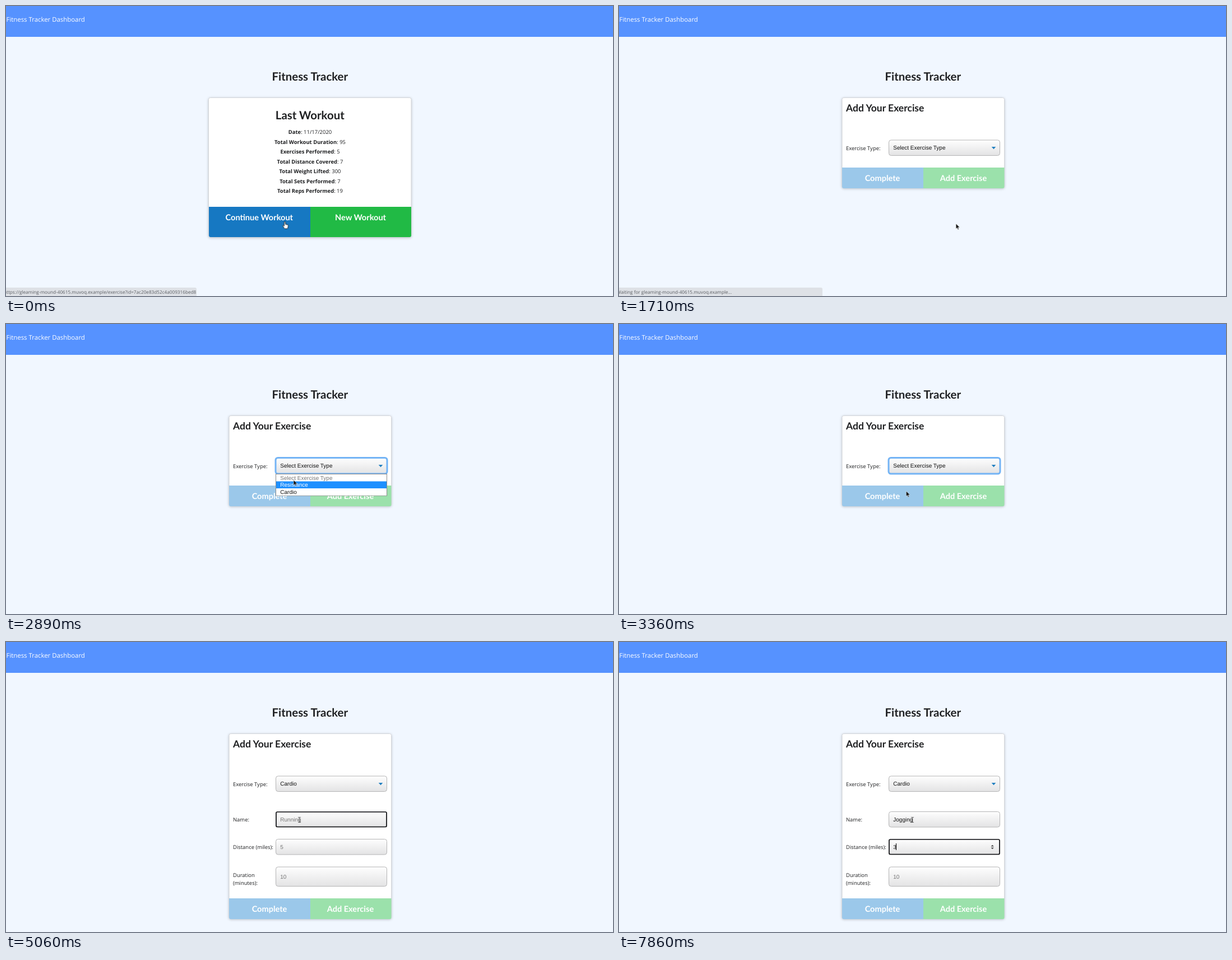
Animation, 1083 px wide and 517 px high, one loop 8000 ms. Source, as an HTML page:

```html
<!DOCTYPE html>
<html lang="en">
<head>
<meta charset="utf-8">
<title>Fitness Tracker</title>
<style>
html, body { margin: 0; height: 100%; overflow: hidden; background: #f1f7ff; }
svg { display: block; width: 100vw; height: 100vh; text-rendering: geometricPrecision; }
text { font: 9.45px "Open Sans", "Noto Sans", sans-serif; fill: #1f2022; white-space: pre; }
.b { font-weight: 700; }
.mid { text-anchor: middle; }
.bar { font-size: 11.4px; fill: #fff; }
.h1, .h2, .btn { font-family: Lato, sans-serif; font-weight: 700; }
.h1 { font-size: 20.4px; }
.h2 { font-size: 17.5px; }
.btn { font-size: 14.55px; fill: #fff; }
.field text { font: 10px "Liberation Sans", Arial, sans-serif; fill: #111; }
.field .hint { fill: #757575; }
.box { fill: url(#shade); stroke: #b4b4b5; }
.outline { fill: none; stroke: #101114; stroke-width: 1.7; }
.outline, .spin { display: none; }
.spin { fill: #444; }
.focus .outline, .focus .spin { display: block; }
.status path { fill: #dee1e6; }
.status text { font-size: 8.2px; fill: #5a5d62; }
.card { fill: #fff; stroke: #d4d6da; filter: drop-shadow(0 1px 2px rgba(0,0,0,.22)); }

/* 1% = 80ms */
svg [id] { animation: 8s step-end infinite; }
#home { animation-name: until-load; }
#exercise { animation-name: from-load; }
#goOn { animation-name: leave; }
#fresh { animation-name: enter; }
#link1 { animation-name: link1; }
#link2 { animation-name: link2; }
#wait { animation-name: wait; }
#sheet { animation-name: grow; }
#actions { animation-name: drop; }
#unset { animation-name: until-pick; }
#picked { animation-name: from-pick; }
#ring { animation-name: ring; }
#ghost { animation-name: ghost; }
#menu { animation-name: menu; }
#row1 { animation-name: row1; }
#row2 { animation-name: row2; }
#menu .opt { fill: currentColor; }
#pointer { animation-name: travel; animation-timing-function: ease-in-out; }
#hand { animation-name: hand; }
#arrow { animation-name: arrow; }
#beam { animation-name: beam; }
#click { animation-name: click; }
@keyframes until-load { 0% { opacity: 1 } 17.375% { opacity: 0 } }
@keyframes from-load { 0% { opacity: 0 } 17.375% { opacity: 1 } }
@keyframes leave { 0% { fill: #1678c2 } 12% { fill: #2185d0 } }
@keyframes enter { 0% { fill: #21ba45 } 12% { fill: #16ab39 } 15.5% { fill: #0ea432 } }
@keyframes link1 { 0% { opacity: 1 } 12% { opacity: 0 } }
@keyframes link2 { 0% { opacity: 0 } 12% { opacity: 1 } 15.5% { opacity: 0 } }
@keyframes wait { 0% { opacity: 0 } 15.5% { opacity: 1 } 22.375% { opacity: 0 } }
@keyframes grow { 0% { height: 161px } 42.75% { height: 330px } }
@keyframes drop { 0% { transform: none } 42.75% { transform: translateY(169px) } }
@keyframes until-pick { 0% { opacity: 1 } 42.75% { opacity: 0 } }
@keyframes from-pick { 0% { opacity: 0 } 42.75% { opacity: 1 } }
@keyframes ring { 0% { opacity: 0 } 28% { opacity: 1 } 56.5% { opacity: 0 } }
@keyframes ghost { 0% { opacity: 0 } 29% { opacity: 1 } 30% { opacity: 0 } }
@keyframes menu { 0% { opacity: 0 } 30% { opacity: 1 } 42% { opacity: 0 } }
@keyframes row1 { 0% { fill: #fff; color: #111 } 36% { fill: #1e90ff; color: #fff } 38% { fill: #fff; color: #111 } }
@keyframes row2 { 0% { fill: #fff; color: #111 } 38% { fill: #1e90ff; color: #fff } }
@keyframes hand { 0% { opacity: 1 } 18.375% { opacity: 0 } }
@keyframes arrow { 0% { opacity: 0 } 18.375% { opacity: 1 } 51.5% { opacity: 0 } }
@keyframes beam { 0% { opacity: 0 } 51.5% { opacity: 1 } }
@keyframes click { 0% { opacity: 0 } 28% { opacity: .75 } 30% { opacity: 0 } }
@keyframes travel {
  0%, 8.75% { transform: translate(497.5px, 384.5px) }
  15.5%, 20.375% { transform: translate(604px, 392px) }
  28.5%, 33% { transform: translate(513.5px, 263.5px) }
  39.875%, 51.49% { transform: translate(512.5px, 298px) }
  51.5% { transform: translate(512px, 303px) }
  57%, 100% { transform: translate(523.5px, 317px) }
}
</style>
</head>
<body>
<svg viewBox="0 0 1083 517">
  <defs>
    <linearGradient id="shade" x2="0" y2="1"><stop stop-color="#fefefe"/><stop offset="1" stop-color="#e3e3e4"/></linearGradient>
  </defs>
  <rect width="1083" height="517" fill="#f1f7ff"/>
  <rect width="1083" height="55" fill="#5692ff"/>
  <text class="bar" x=".5" y="27.5">Fitness Tracker Dashboard</text>
  <text class="h1 mid" x="542.3" y="133.3">Fitness Tracker</text>

  <g id="home">
    <rect class="card" x="361.5" y="163.5" width="361.5" height="248.5" rx="3"/>
    <text class="h1 mid" x="542.3" y="202.2">Last Workout</text>
    <g class="mid">
      <text x="542.5" y="228.2"><tspan class="b">Date</tspan>: 11/17/2020</text>
      <text x="542.5" y="245.8"><tspan class="b">Total Workout Duration</tspan>: 95</text>
      <text x="542.5" y="263.3"><tspan class="b">Exercises Performed</tspan>: 5</text>
      <text x="542.5" y="280.8"><tspan class="b">Total Distance Covered</tspan>: 7</text>
      <text x="542.5" y="298.3"><tspan class="b">Total Weight Lifted</tspan>: 300</text>
      <text x="542.5" y="315.8"><tspan class="b">Total Sets Performed</tspan>: 7</text>
      <text x="542.5" y="333.4"><tspan class="b">Total Reps Performed</tspan>: 19</text>
    </g>
    <path id="goOn" d="M362 358h181v54h-178a3 3 0 0 1-3-3z"/>
    <path id="fresh" d="M543 358h180v51a3 3 0 0 1-3 3h-177z"/>
    <text class="btn mid" x="451.8" y="382.2">Continue Workout</text>
    <text class="btn mid" x="632.5" y="382.2">New Workout</text>
  </g>

  <g id="exercise">
    <rect id="sheet" class="card" x="398" y="163.5" width="289.5" height="161" rx="3"/>
    <text class="h2" x="405" y="188.3">Add Your Exercise</text>
    <text x="405" y="256.6">Exercise Type:</text>
    <g id="actions">
      <path fill="#9bc8ea" d="M398 288h145v37h-142a3 3 0 0 1-3-3z"/>
      <path fill="#9be1ab" d="M543 288h144.5v34a3 3 0 0 1-3 3h-141.5z"/>
      <text class="btn mid" x="470" y="312.1">Complete</text>
      <text class="btn mid" x="614.5" y="312.1">Add Exercise</text>
    </g>

    <g class="field">
      <rect class="box" x="481.5" y="239" width="198" height="27.5" rx="4"/>
      <rect id="ring" x="481" y="238.5" width="199" height="28.5" rx="4" fill="none" stroke="#74b4f5" stroke-width="3"/>
      <path fill="#2180c0" d="M664.7 251h7.6l-3.8 4.2z"/>
      <text id="unset" x="489.3" y="256.2">Select Exercise Type</text>
    </g>

    <g id="picked">
      <text x="405" y="320.3">Name:</text>
      <text x="405" y="369.3">Distance (miles):</text>
      <text x="405" y="418.5">Duration</text>
      <text x="405" y="432.5">(minutes):</text>
      <g class="field"><text x="489.3" y="256.2">Cardio</text></g>
      <g class="field" id="name">
        <rect class="box" x="481.5" y="302.5" width="198" height="27.5" rx="4"/>
        <rect class="outline" x="482" y="303" width="197" height="26.5" rx="2"/>
        <text x="489.3" y="319.8"></text>
        <rect class="caret" y="310" width="1" height="12"/>
      </g>
      <g class="field" id="distance">
        <rect class="box" x="481.5" y="351.5" width="198" height="27.5" rx="4"/>
        <rect class="outline" x="482" y="352" width="197" height="26.5" rx="2"/>
        <path class="spin" d="M663.5 364.5h5.4l-2.7-2.8zM663.5 366.5h5.4l-2.7 2.8z"/>
        <text x="489.3" y="369"></text>
        <rect class="caret" y="359" width="1" height="12"/>
      </g>
      <g class="field">
        <rect class="box" x="481.5" y="401" width="198" height="34.5" rx="4"/>
        <text class="hint" x="489.3" y="421.6">10</text>
      </g>
    </g>

    <path id="ghost" d="M482 268h198v38h-198z" fill="#888" fill-opacity=".1" stroke="#666" stroke-opacity=".4"/>
    <g id="menu" class="field">
      <rect x="481.5" y="267.5" width="198" height="38.5" fill="#fff" stroke="#8a8a8a"/>
      <text class="hint" x="489.3" y="277.8">Select Exercise Type</text>
      <g id="row1"><rect x="482" y="280.5" width="197" height="12.5"/><text class="opt" x="489.3" y="290.3">Resistance</text></g>
      <g id="row2"><rect x="482" y="293" width="197" height="12.5"/><text class="opt" x="489.3" y="302.8">Cardio</text></g>
    </g>
  </g>

  <g id="link1" class="status">
    <path d="M0 502h337a3 3 0 0 1 3 3v12h-340z"/>
    <text x="-4" y="513.3">https://gleaming-mound-40615.muvoq.example/exercise?id=7ac20e83d52c4a009316bed8</text>
  </g>
  <g id="link2" class="status">
    <path d="M0 502h360a3 3 0 0 1 3 3v12h-363z"/>
    <text x="-4" y="513.3">https://gleaming-mound-40615.muvoq.example/exercise?</text>
  </g>
  <g id="wait" class="status">
    <path d="M0 502h360a3 3 0 0 1 3 3v12h-363z"/>
    <text x="-4" y="513.3">Waiting for gleaming-mound-40615.muvoq.example...</text>
  </g>

  <g id="pointer">
    <circle id="click" cx="-.5" cy=".5" r="8.5" fill="#fbe92e"/>
    <path id="hand" fill="#fff" stroke="#111" stroke-width=".9" d="M-1.1 1a1.1 1.1 0 0 1 2.2 0v3.6l4 .9q1.2.4 1 1.8l-.7 3.6q-.3 1.6-1.6 1.6h-3.4q-.9 0-1.4-.8l-2.6-3.9q-.4-.9.4-1.3.8-.2 2.1 1.4z"/>
    <path id="arrow" fill="#0c0c0c" stroke="#fff" stroke-width=".5" d="M0 0v9.3l2.1-2 1.5 3.4 1.5-.6-1.5-3.4h3z"/>
    <path id="beam" fill="none" stroke="#333" stroke-width=".9" d="M-2.2-4.5h1.6l.6.5.6-.5h1.6M0-4v8M-2.2 4.5h1.6l.6-.5.6.5h1.6"/>
  </g>
</svg>
<script>
const LOOP = 8000, FOCUS_NAME = 4520, CARET_OFF = 5060, TAB = 7480;
const keys = [5690, 5840, 6070, 6300, 6470, 6620, 7000];

function field(id, hint) {
  const root = document.getElementById(id);
  const label = root.querySelector('text');
  const caret = root.querySelector('.caret');
  return (value, focused, caretOn) => {
    root.classList.toggle('focus', focused);
    label.classList.toggle('hint', !value);
    label.textContent = value || hint;
    const end = value ? label.getComputedTextLength() : 0;
    caret.setAttribute('x', Math.round(489.3 + end - 0.5));
    caret.style.display = focused && caretOn ? '' : 'none';
  };
}

const setName = field('name', 'Running');
const setDistance = field('distance', '5');

function render() {
  const t = performance.now() % LOOP;
  const typed = keys.filter(k => t >= k).length;
  setName('Jogging'.slice(0, typed), t >= FOCUS_NAME && t < TAB, t < CARET_OFF || typed > 0);
  setDistance(t >= 7860 ? '3' : '', t >= TAB, true);
  requestAnimationFrame(render);
}
render();
</script>
</body>
</html>
```
